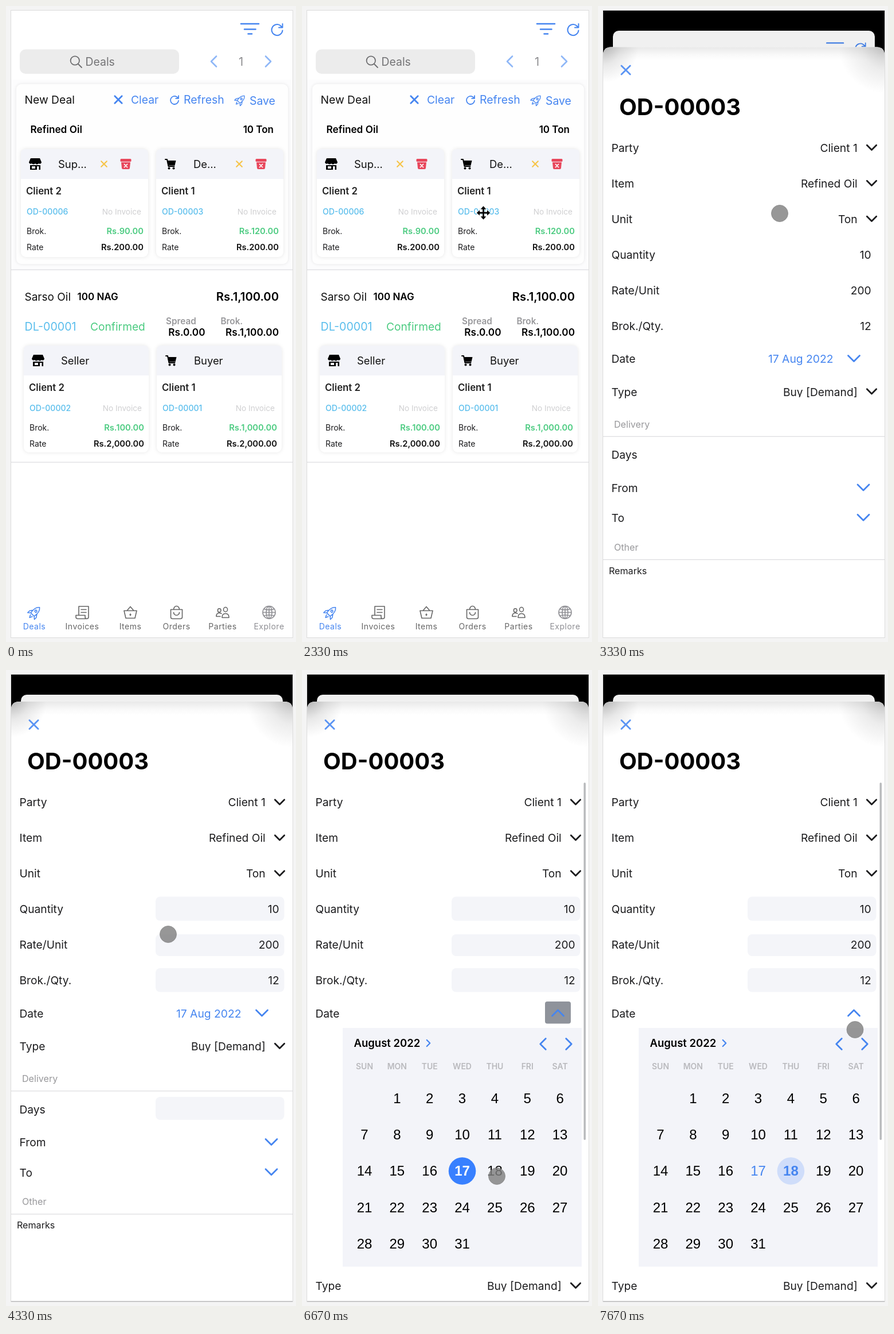
Write an HTML page that moves like this. It is 506 by 1107 pixels and loops after 8000 ms.

```html
<!DOCTYPE html>
<html lang="en">
<head>
<meta charset="utf-8">
<title>Deals</title>
<style>
  html, body { margin: 0; width: 100%; height: 100%; overflow: hidden; background: #f4f4f4; }
  svg { display: block; width: 506px; height: 1107px; }
  text { font-family: Inter, "Open Sans", sans-serif; white-space: pre; }
  .day { font-family: "Liberation Sans", Arial, sans-serif; font-size: 24px; }
  .line { fill: none; stroke: currentColor; stroke-linecap: round; stroke-linejoin: round; }
  .soft { filter: drop-shadow(0 0 3px rgba(0, 0, 0, .1)); }
</style>
</head>
<body>
<svg id="stage" viewBox="0 0 506 1107"></svg>
<script>
const BLUE = '#4585f0', CYAN = '#58bdec', GREEN = '#4bcb80', INK = '#1c1c1e', PALE = '#f3f4f9';
const LOOP = 8000;

const text = (x, y, s, size, o = {}) =>
  `<text x="${x}" y="${y}" font-size="${size}" font-weight="${o.w || 400}" fill="${o.c || INK}"` +
  ` text-anchor="${o.a || 'start'}" letter-spacing="${o.ls || 0}">${s}</text>`;
const rect = (x, y, w, h, fill, r = 0, extra = '') =>
  `<rect x="${x}" y="${y}" width="${w}" height="${h}" rx="${r}" fill="${fill}" ${extra}/>`;
const line = (d, color, width) => `<path class="line" d="${d}" style="color:${color}" stroke-width="${width}"/>`;
const at = (x, y, body, more = '') => `<g transform="translate(${x} ${y}) ${more}">${body}</g>`;
const rule = y => rect(9, y - .5, 491, 1.2, '#dcdcdf');
const cross = (x, y, r, color, width) => at(x, y, line(`M${-r} ${-r}L${r} ${r}M${r} ${-r}L${-r} ${r}`, color, width));
const chevron = (x, y, r, angle, color, width = 2.8) =>
  at(x, y, line(`M${-r} ${-r / 2}L0 ${r / 2}L${r} ${-r / 2}`, color, width), `rotate(${angle})`);

// Icons, each centred on its origin
const rocket = (x, y, color, scale = 1) => at(x, y, line(
  'M0 -14C5 -10 6 -3 4.5 5H-4.5C-6 -3 -5 -10 0 -14ZM-5 -2L-9 4V9L-4.5 5M5 -2L9 4V9L4.5 5M-2.5 8L0 13L2.5 8' +
  'M2 -4A2 2 0 1 1 -2 -4A2 2 0 1 1 2 -4', color, 1.7), `rotate(45) scale(${scale})`);
const refresh = (x, y, scale, width) => at(x, y,
  line('M9.5 1.5A9.5 9.5 0 1 1 5 -7.5L9 -4M9.5 -10V-3.5H3', BLUE, width), `scale(${scale})`);
const shop = `<path d="M-8 -10H8L11 -3A3 3 0 0 1 6 -1A3.6 3.6 0 0 1 0 -1A3.6 3.6 0 0 1 -6 -1A3 3 0 0 1 -11 -3Z"/>
  <path d="M-9 2H9V10H-9Z"/>${rect(-6, 4, 6, 4, PALE)}${rect(3, 4, 3.5, 6, PALE)}`;
const cart = line('M-9 -8H-6L-3.5 4H6.5', '#000', 2) +
  '<path d="M-6 -6H9.5L7.5 2.5H-4.5Z"/><circle cx="-2.5" cy="7.5" r="2"/><circle cx="5.5" cy="7.5" r="2"/>';
const bin = rect(-9.5, -9, 19, 5, '#e8475c', 1.5) + '<path d="M-8 -3H8L7 7Q6.8 9 5 9H-5Q-6.8 9 -7 7Z" fill="#e8475c"/>' +
  cross(0, 3, 2.6, '#fff', 1.6);

function card(x, y, w, c) {
  const right = x + w - 8, h = w > 220 ? 188 : 186;
  return rect(x, y, w, h, '#fff', 9, 'class="soft"') +
    `<path d="M${x} ${y + 52}V${y + 9}q0 -9 9 -9H${x + w - 9}q9 0 9 9V${y + 52}Z" fill="${PALE}"/>` +
    at(x + 25, y + 26, c.icon) + text(x + 65, y + 33, c.title, 18.4, { c: '#111' }) +
    (c.edit ? cross(x + 145, y + 26, 4.8, '#f7c54a', 2.2) + at(x + 183, y + 26, bin) : '') +
    text(x + 9, y + 79, c.client, 16.8, { w: 600, c: '#222' }) +
    text(x + 10, y + 114.3, c.id, 14, { w: 500, c: CYAN }) +
    text(x + w - 12, y + 114.3, 'No Invoice', 13.6, { c: '#cfcfd1', a: 'end' }) +
    text(x + 10, y + 148, 'Brok.', 14) + text(right, y + 148, c.fee, 14.7, { w: 600, c: GREEN, a: 'end' }) +
    text(x + 10, y + 176, 'Rate', 14) + text(right, y + 176, c.rate, 14.7, { w: 600, c: '#111', a: 'end' });
}

const TABS = [
  ['Deals', 49.5, ''],
  ['Invoices', 133, 'M-6 -10.5H11V5M-6 -10.5V5M-11 5H5V8Q5 11 8 11Q11 11 11 8V5M-11 5V8Q-11 11 -8 11H8M-2 -5H7M-2 0H7'],
  ['Items', 217, 'M-11 -3H11L8 10H-8ZM-6 -3L0 -10L6 -3M0 2.5V5.5M-1 4H1'],
  ['Orders', 297.5, 'M-10 -5H10V8Q10 11 7 11H-7Q-10 11 -10 8ZM-5 -5A5 6 0 0 1 5 -5M-5 0A5 5 0 0 0 5 0'],
  ['Parties', 378, 'M-1 9Q-1 2 5 2Q11 2 11 9ZM8.5 -5A3.5 4 0 1 1 1.5 -5A3.5 4 0 1 1 8.5 -5M-4 7H-11Q-11 1 -6 1Q-4 1 -2 2M-3 -3.5A2.8 3.2 0 1 1 -8.6 -3.5A2.8 3.2 0 1 1 -3 -3.5'],
  ['Explore', 459, 'M11 0A11 11 0 1 1 -11 0A11 11 0 1 1 11 0M5 0A5 11 0 1 1 -5 0A5 11 0 1 1 5 0M-11 0H11M0 -11V11M-9 -6Q0 -3 9 -6M-9 6Q0 3 9 6'],
];

function dealsPage() {
  const bold = (x, y, s, size, a, c = '#000') => text(x, y, s, size, { w: 600, a, c });
  const tabs = TABS.map(([name, x, d], i) => {
    const color = i ? (i === 5 ? '#8e8e93' : '#666') : BLUE;
    return (d ? at(x, 1055.5, line(d, color, 1.6)) : rocket(x, 1056, BLUE, .92)) +
      text(x, 1084.5, name, 14, { c: color, a: 'middle', ls: .5 });
  }).join('');
  return rect(9, 8, 491, 1091, '#fff') +
    line('M410 31H441M416 40.5H435.5M422.5 48.5H429', BLUE, 2.6) + refresh(473, 41, 1, 2) +
    rect(24, 75.5, 278, 42.5, '#ececec', 10) +
    at(121, 95, line('M7 0A7.7 7.7 0 1 1 -8.4 0A7.7 7.7 0 1 1 7 0M5 6L11 12', '#6e6e70', 1.8)) +
    text(138.5, 104, 'Deals', 19.4, { c: '#747476' }) +
    chevron(362.5, 96.5, 9, 90, '#8fb7f7', 2.6) + text(410, 104, '1', 20, { c: '#8b8b8e', a: 'middle' }) +
    chevron(457.5, 96.5, 9, -90, '#8fb7f7', 2.6) +
    rect(9, 128, 491, 331, '#fcfcfd') + rect(18, 136, 474, 313, '#fff', 9, 'class="soft" style="opacity:.9"') +
    text(32.5, 170, 'New Deal', 19.3, { c: '#111' }) +
    cross(196, 163, 6.2, BLUE, 2.8) + text(218, 170.3, 'Clear', 19.3, { c: BLUE }) +
    refresh(294, 163.5, .74, 2.4) + text(310, 170.3, 'Refresh', 19.4, { c: BLUE }) +
    rocket(408.5, 164, BLUE, .76) + text(425, 171.7, 'Save', 19.4, { c: BLUE }) +
    bold(42.5, 221.3, 'Refined Oil', 17.2) + bold(467, 221.3, '10 Ton', 17, 'end') +
    card(26, 249, 222, { icon: shop, title: 'Sup...', edit: 1, client: 'Client 2', id: 'OD-00006', fee: 'Rs.90.00', rate: 'Rs.200.00' }) +
    card(262, 249, 222, { icon: cart, title: 'De...', edit: 1, client: 'Client 1', id: 'OD-00003', fee: 'Rs.120.00', rate: 'Rs.200.00' }) +
    rule(459) + text(32.5, 512.5, 'Sarso Oil', 19, { c: '#111' }) +
    bold(124.5, 512.3, '100 NAG', 17) + bold(476, 512.7, 'Rs.1,100.00', 20.2, 'end') +
    text(32.5, 565.3, 'DL-00001', 19.6, { c: CYAN }) + text(147, 565.3, 'Confirmed', 19.2, { c: GREEN }) +
    bold(279, 553.5, 'Spread', 15.3, 'start', '#98989b') + bold(374.5, 553.5, 'Brok.', 15.3, 'start', '#98989b') +
    bold(347.5, 573.7, 'Rs.0.00', 17.2, 'end') + bold(476, 573.7, 'Rs.1,100.00', 17.2, 'end') +
    card(31, 591, 218, { icon: shop, title: 'Seller', client: 'Client 2', id: 'OD-00002', fee: 'Rs.100.00', rate: 'Rs.2,000.00' }) +
    card(263, 591, 218, { icon: cart, title: 'Buyer', client: 'Client 1', id: 'OD-00001', fee: 'Rs.1,000.00', rate: 'Rs.2,000.00' }) +
    rule(794) + tabs;
}

function calendar() {
  const col = i => 109 + 56.85 * i, row = i => 745.2 + 63.3 * i;
  const names = ['SUN', 'MON', 'TUE', 'WED', 'THU', 'FRI', 'SAT']
    .map((n, i) => text(col(i), 694.7, n, 14, { w: 600, c: '#b9b9bd', a: 'middle' })).join('');
  let days = '';
  for (let d = 1; d <= 31; d++) {
    const x = col(d % 7), y = row(Math.floor(d / 7));
    if (d === 17 || d === 18) days += `<circle id="dot${d}" cx="${x}" cy="${y + .2}" r="23.8"/>`;
    days += `<text class="day" id="day${d}" x="${x}" y="${y + 8.5}" text-anchor="middle" fill="#000">${d}</text>`;
  }
  return rect(71, 623, 417, 415.5, PALE) + text(90.5, 656, 'August 2022', 18.5, { w: 600, c: '#000' }) +
    chevron(220.5, 649.5, 5.5, -90, BLUE, 2.2) + chevron(420.5, 651, 9.5, 90, BLUE) + chevron(465.5, 651, 9.5, -90, BLUE) +
    names + days + rect(491.5, 196, 3.5, 622, '#b9bbbd', 1.7);
}

function orderSheet() {
  const label = (y, s) => text(23.5, y, s, 19.2);
  const value = (y, s, x = 452.7) => text(x, y, s, 19.2, { a: 'end' });
  const pick = (y, name, s) => label(y, name) + value(y, s) + chevron(477.5, y - 7.5, 8.2, 0, INK);
  const section = (y, s) => text(28, y, s, 16.1, { c: '#98989b' }) + rule(y + 15.7);
  const boxes = [[394.5, 42], [460, 38], [519, 41.5], [743, 40]].map(([y, h]) => rect(261, y, 224.5, h, '#f4f5f9', 8)).join('');
  const body = 'M9 1100V69Q9 55 23 55H486Q500 55 500 69V1100Z';
  return `<path d="${body}" fill="#fff"/>` +
    ['top', 'left', 'right'].map(id => `<path d="${body}" fill="url(#${id}Shade)"/>`).join('') +
    cross(48.5, 95, 7.6, '#5a94f4', 2.8) + text(37, 173, 'OD-00003', 40, { w: 700, c: '#000' }) +
    `<g id="boxes">${boxes}</g>` +
    pick(237.3, 'Party', 'Client 1') + pick(299.3, 'Item', 'Refined Oil') + pick(361.3, 'Unit', 'Ton') +
    label(423.3, 'Quantity') + value(423.3, '10', 476.7) + label(485.3, 'Rate/Unit') + value(485.3, '200', 476.7) +
    label(547.3, 'Brok./Qty.') + value(547.3, '12', 476.7) + label(604.5, 'Date') +
    `<g id="date">${text(410.5, 604.7, '17 Aug 2022', 19.3, { c: BLUE, a: 'end' })}${chevron(446.5, 597, 10, 0, BLUE)}</g>` +
    `<g id="rest">${label(662, 'Type')}<g clip-path="url(#crop)">${value(662, 'Buy [Demand]')}</g>` +
    chevron(477.5, 654.3, 8.2, 0, INK) + section(717, 'Delivery') + label(771.7, 'Days') +
    label(829.3, 'From') + chevron(463, 821.5, 10, 0, BLUE) + label(881.5, 'To') + chevron(463, 873.7, 10, 0, BLUE) +
    section(931.3, 'Other') + text(19, 972, 'Remarks', 16.1) + '</g>' +
    `<g id="open">${rect(424, 577, 45, 38.5, '#8f939b', 4, 'id="focus"')}${chevron(446.5, 597, 10, 180, BLUE)}${calendar()}</g>`;
}

const fade = (id, x, r, alpha) => `
  <radialGradient id="${id}" gradientUnits="userSpaceOnUse" cx="${x}" cy="55" r="${r}">
    <stop offset="0" stop-color="#808080" stop-opacity="${alpha}"/>
    <stop offset=".5" stop-color="#808080" stop-opacity="${alpha * .35}"/>
    <stop offset="1" stop-color="#808080" stop-opacity="0"/>
  </radialGradient>`;
const arrows = [0, 90, 180, 270].map(a => `<path d="M-1.3 0V-6.5H-4.5L0 -11.5L4.5 -6.5H1.3V0Z" transform="rotate(${a})"/>`).join('');
document.getElementById('stage').innerHTML = `
  <defs>
    <clipPath id="phone"><rect x="9" y="8" width="491" height="1091"/></clipPath>
    <clipPath id="round"><rect id="corner" x="9" y="8" width="491" height="1091"/></clipPath>
    <clipPath id="crop"><rect x="300" y="640" width="160" height="24.5"/></clipPath>
    <linearGradient id="topShade" gradientUnits="userSpaceOnUse" x1="0" y1="55" x2="0" y2="78">
      <stop offset="0" stop-color="#e9e9e9"/><stop offset=".6" stop-color="#f9f9f9"/><stop offset="1" stop-color="#fff"/>
    </linearGradient>
    ${fade('leftShade', 9, 62, .5)}${fade('rightShade', 500, 80, .42)}
  </defs>
  ${rect(0, 0, 506, 1107, '#f4f4f4')}
  <g clip-path="url(#phone)">
    ${rect(9, 8, 491, 1091, '#000', 0, 'id="black"')}
    <g id="page"><g clip-path="url(#round)">${dealsPage()}${rect(9, 8, 491, 1091, '#000', 0, 'id="dim"')}</g></g>
    <g id="sheet">${orderSheet()}</g>
  </g>
  ${rect(8.5, 7.5, 492, 1092, 'none', 0, 'stroke="#dcdcdc"')}
  ${rect(9, 1098.5, 491, 1, '#a4a4a6', 0, 'id="foot"')}
  <g id="move" stroke="#fff" stroke-width="2" paint-order="stroke">${arrows}<g stroke="none">${arrows}</g></g>
  <circle id="touch" r="14.5" fill="#808080" fill-opacity=".82" stroke="#888" stroke-width=".8"/>`;

const $ = id => document.getElementById(id);
const show = (id, on) => $(id).setAttribute('visibility', on ? 'inherit' : 'hidden');
const set = (id, attrs) => Object.entries(attrs).forEach(([k, v]) => $(id).setAttribute(k, v));

// time, x, y
const POINTER = [
  [670, 452, 318], [1000, 352, 345], [1330, 311, 366], [1670, 311, 365], [2000, 316.5, 360],
  [3000, 317, 361], [4000, 305, 400], [4330, 283, 460], [5000, 402, 594], [5330, 395, 611],
  [5670, 406, 603], [6000, 440, 603], [6330, 363, 733], [6670, 340, 881], [7330, 385, 770], [7670, 448.5, 626],
];
// time, sheet offset, how far the page has shrunk
const SLIDE = [[0, 1100, 0], [3000, 560, .5], [3330, 16.5, 1], [3670, 0, 1]];
const stepAt = (steps, t) => steps.filter(s => s[0] <= t).pop();

function render(t) {
  const [, drop, k] = stepAt(SLIDE, t), scale = 1 - .0693 * k;
  const modal = t >= 3000, settled = t >= 3670, opened = t >= 6000, picked = t >= 7000;
  show('black', modal);
  show('sheet', modal);
  show('foot', settled);
  show('boxes', settled);
  set('sheet', { transform: `translate(0 ${drop})` });
  set('page', { transform: `translate(${9 + 17 * k} ${8 + 35 * k}) scale(${scale}) translate(-9 -8)` });
  set('corner', { rx: 11 * k });
  set('dim', { opacity: .06 * k });

  show('date', !opened);
  show('open', opened);
  show('focus', opened && !picked);
  set('rest', { transform: `translate(0 ${opened ? 417 : 0})` });
  set('dot17', { fill: picked ? 'none' : '#3880ff' });
  set('dot18', { fill: picked ? '#cfddfa' : 'none' });
  set('day17', { fill: picked ? BLUE : '#fff', 'font-weight': picked ? 400 : 700 });
  set('day18', { fill: picked ? BLUE : '#000', 'font-weight': picked ? 700 : 400 });

  const p = stepAt(POINTER, t);
  show('move', p && !modal);
  show('touch', p && modal);
  if (p) set(modal ? 'touch' : 'move', { transform: `translate(${p[1]} ${p[2]})` });
}

const start = performance.now();
function tick() {
  render((performance.now() - start) % LOOP);
  requestAnimationFrame(tick);
}
tick();
</script>
</body>
</html>
```
